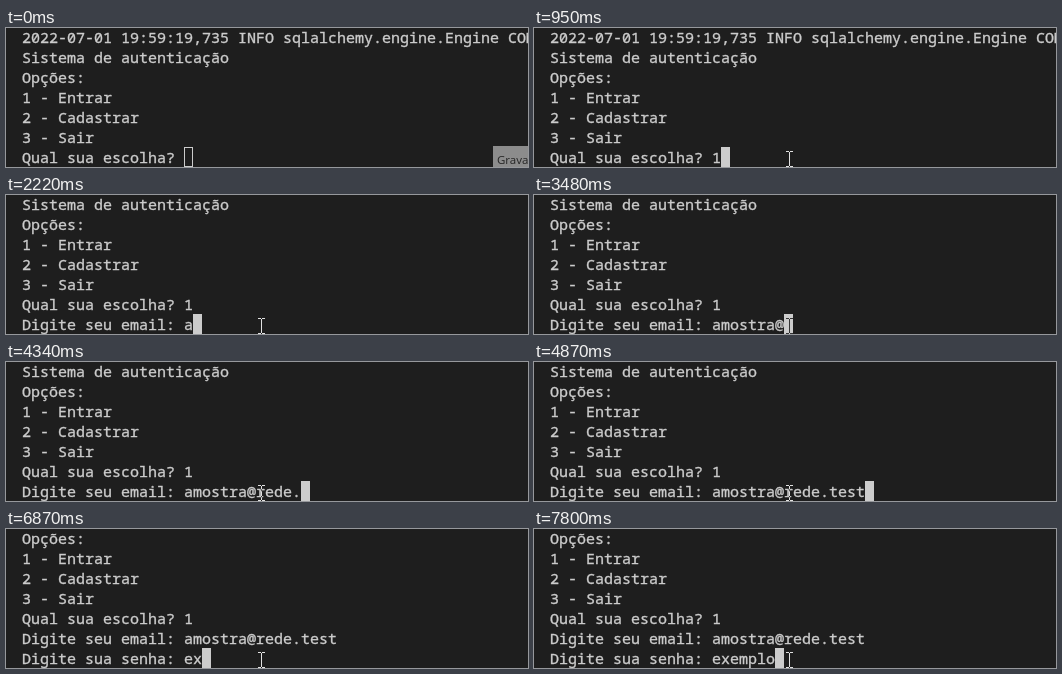
Animation, 522 px wide and 139 px high, one loop 8000 ms. Source, as an HTML page with a canvas:

```html
<!DOCTYPE html>
<html lang="pt">
<head>
<meta charset="utf-8">
<style>
  html, body { margin: 0; width: 522px; height: 139px; overflow: hidden; background: #1e1e1e; }
  canvas { display: block; }
</style>
</head>
<body>
<canvas id="stage" width="522" height="139"></canvas>
<script>
const ctx = document.getElementById('stage').getContext('2d');
const LOOP = 8000, LEFT = 16, CELL = 9, ROW = 20, BASE = 135;
const FG = '#cccccc', BG = '#1e1e1e';

const log = [
  '2022-07-01 19:59:19,735 INFO sqlalchemy.engine.Engine COMMIT',
  'Sistema de autenticação', 'Opções:', '1 - Entrar', '2 - Cadastrar', '3 - Sair'
];

// Each prompt: time its line opens, time its label shows, typed answer and key times.
const prompts = [
  { open: 0, show: 0, label: 'Qual sua escolha? ', answer: '1', keys: [950] },
  { open: 1280, show: 1350, label: 'Digite seu email: ', answer: 'amostra@rede.test',
    keys: [2220, 2350, 2480, 2550, 2810, 3010, 3210, 3480,
           3810, 3940, 4010, 4140, 4340, 4540, 4670, 4740, 4870] },
  { open: 5530, show: 5600, label: 'Digite sua senha: ', answer: 'exemplo',
    keys: [6740, 6870, 7000, 7130, 7400, 7600, 7800] }
];

function promptText(p, t) {
  const typed = p.keys.filter(k => k <= t).length;
  return t < p.show ? '' : p.label + p.answer.slice(0, typed);
}

function drawTerminal(t) {
  const lines = log.concat(prompts.filter(p => p.open <= t).map(p => promptText(p, t)));
  const last = lines.length - 1;
  ctx.font = '15px "Noto Sans Mono", monospace';
  ctx.fillStyle = ctx.strokeStyle = FG;
  ctx.lineWidth = 0.35; // a thin outline gives the heavier screen weight
  lines.forEach((line, i) => {
    const y = BASE - (last - i) * ROW;
    ctx.fillText(line, LEFT, y);
    ctx.strokeText(line, LEFT, y);
  });

  const x = LEFT + lines[last].length * CELL;
  ctx.lineWidth = 1;
  if (t < 620) ctx.strokeRect(x + 0.5, 119.5, CELL - 1, ROW - 1);
  else ctx.fillRect(x, 119, CELL, ROW);
}

function drawTooltip(t) {
  if (t >= 140) return;
  ctx.globalAlpha = t < 70 ? 1 : 0.45;
  ctx.fillStyle = '#8c8c8c';
  ctx.fillRect(487, 118, 35, 21);
  ctx.fillStyle = '#262626';
  ctx.font = '11.5px "Open Sans", sans-serif';
  ctx.fillText('Gravar', 491, 136);
  ctx.globalAlpha = 1;
}

// Text pointer; inverts whatever lies below it.
function drawPointer(t) {
  if (t < 290) return;
  const left = (1 - Math.min(1, (t - 290) / 260)) ** 2;
  const x = Math.round(255 + 50 * left), y = Math.round(123 + 8 * left);
  ctx.globalCompositeOperation = 'difference';
  ctx.fillStyle = '#ffffff';
  for (const serif of [y, y + 15]) {
    ctx.fillRect(x - 3, serif, 3, 1);
    ctx.fillRect(x + 1, serif, 3, 1);
  }
  ctx.fillRect(x, y + 1, 1, 14);
  ctx.globalCompositeOperation = 'source-over';
}

function draw() {
  const t = performance.now() % LOOP;
  ctx.fillStyle = BG;
  ctx.fillRect(0, 0, 522, 139);
  drawTerminal(t);
  drawTooltip(t);
  drawPointer(t);
  requestAnimationFrame(draw);
}
draw();
</script>
</body>
</html>
```
